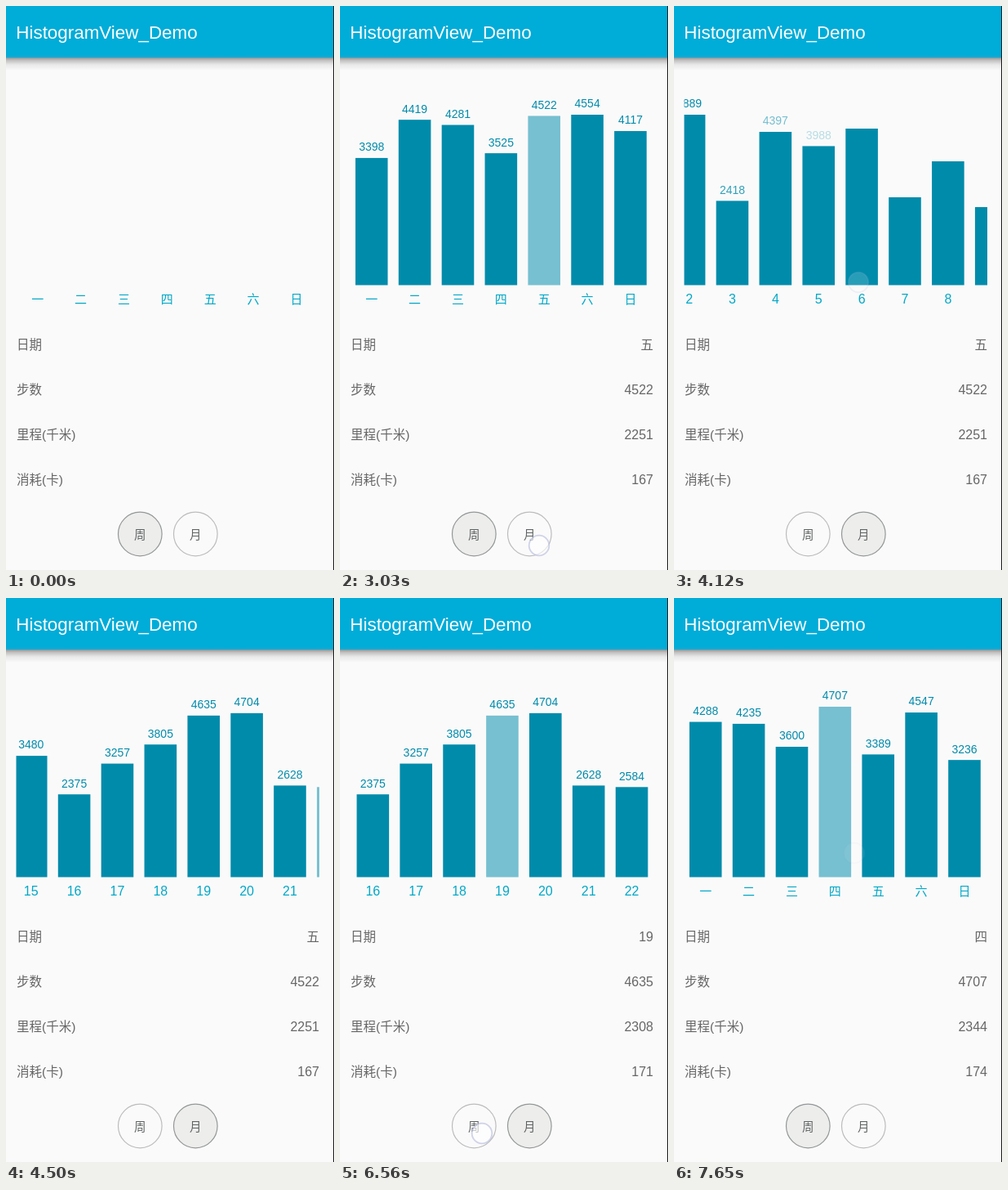
An HTML page with a canvas for the animation above (7.72 s loop, 402x690 px).

```html
<!DOCTYPE html>
<html lang="zh">
<head>
<meta charset="utf-8">
<title>HistogramView_Demo</title>
<style>
html, body { margin: 0; width: 100%; height: 100%; overflow: hidden; background: #fafafa; }
canvas { display: block; width: 402px; height: 690px; }
</style>
</head>
<body>
<canvas id="stage"></canvas>
<script>
const W = 402, H = 690, LOOP = 7720;
const BASE = 341.5, FULL = 208.5, LEFT = 18.9, PITCH = 52.88, BAR = 39.6;
const CLIP_L = 12.5, CLIP_R = 384;
const STAGGER = 68, FADE = 250, GROW = 620;
const MAX_SHIFT = 791.6;
const FONT = '"Liberation Sans", "Noto Sans CJK SC", "Noto Sans CJK", sans-serif';

const DAYS = [...'一二三四五六日'];
const WEEK_A = { labels: DAYS, values: [3398, 4419, 4281, 3525, 4522, 4554, 4117] };
const WEEK_B = { labels: DAYS, values: [4288, 4235, 3600, 4707, 3389, 4547, 3236] };
const MONTH = {
  values: [3120, 4889, 2418, 4397, 3988, 4490, 2520, 3552, 2239, 4105, 2870,
    3660, 4280, 2950, 3480, 2375, 3257, 3805, 4635, 4704, 2628, 2584]
};
MONTH.labels = MONTH.values.map((_, i) => String(i + 1));

// Each phase: when a chart is loaded, and which bar is selected from when
const PHASES = [
  { start: 85, data: WEEK_A, tab: 0, picks: [[0, 6], [1535, 5], [1980, 4]] },
  { start: 3080, data: MONTH, tab: 1, picks: [[0, 21], [5770, 19], [6140, 18]] },
  { start: 6600, data: WEEK_B, tab: 0, picks: [[0, 6], [7460, 3]] }
];
const SCROLL = { start: 3850, release: 4120, stop: 4570, drag: 70.6, settle: 4530 };

// [down, up, gone, x, y, travel]
const TOUCHES = [
  [1420, 1530, 1620, 298, 310, 0],
  [1860, 1990, 2100, 250, 310, 0],
  [3030, 3130, 3240, 244, 660, 0],
  [3810, 4050, 4145, 297, 338, -71],
  [5650, 5770, 5880, 252, 305, 0],
  [6020, 6140, 6250, 201, 305, 0],
  [6560, 6670, 6780, 174, 655, 0],
  [7340, 7500, 7670, 221, 312, 0]
];

const canvas = document.getElementById('stage');
const ctx = canvas.getContext('2d');
const dpr = window.devicePixelRatio || 1;
canvas.width = W * dpr;
canvas.height = H * dpr;

const clamp = v => Math.max(0, Math.min(1, v));
const ramp = (t, a, b) => clamp((t - a) / (b - a));
const easeInOut = u => 0.5 - Math.cos(u * Math.PI) / 2;

function text(str, x, y, size, color, align = 'left', weight = 400) {
  ctx.font = `${weight} ${size}px ${FONT}`;
  ctx.fillStyle = color;
  ctx.textAlign = align;
  ctx.fillText(str, x, y);
}

function circle(x, y, r, fill, stroke, width = 1) {
  ctx.beginPath();
  ctx.arc(x, y, r, 0, Math.PI * 2);
  if (fill) {
    ctx.fillStyle = fill;
    ctx.fill();
  }
  ctx.strokeStyle = stroke;
  ctx.lineWidth = width;
  ctx.stroke();
}

function scrollAt(t) {
  if (t < SCROLL.release) {
    return SCROLL.drag * ramp(t, SCROLL.start, SCROLL.release) ** 1.5;
  }
  const u = ramp(t, SCROLL.release, SCROLL.stop);
  return SCROLL.drag + (MAX_SHIFT - SCROLL.drag) * (1 - (1 - u) ** 1.5);
}

function pickAt(phase, t) {
  return phase.picks.filter(([from]) => t >= from).pop()[1];
}

function drawHeader() {
  const shade = ctx.createLinearGradient(0, 63, 0, 79);
  shade.addColorStop(0, 'rgba(0,0,0,.42)');
  shade.addColorStop(0.2, 'rgba(0,0,0,.24)');
  shade.addColorStop(0.55, 'rgba(0,0,0,.07)');
  shade.addColorStop(1, 'rgba(0,0,0,0)');
  ctx.fillStyle = shade;
  ctx.fillRect(0, 63, W, 16);
  ctx.fillStyle = '#00acd8';
  ctx.fillRect(0, 0, W, 63);
  text('HistogramView_Demo', 12.3, 40, 22.4, '#fff');
}

function drawChart(phase, t) {
  const { labels, values } = phase.data;
  const isMonth = phase.data === MONTH;
  const shift = isMonth ? scrollAt(t) : 0;
  const peak = Math.max(...values);
  const grow = easeInOut(ramp(t, phase.start, phase.start + GROW));
  const selected = pickAt(phase, t);
  const first = Math.max(0, Math.ceil((shift - LEFT - BAR + CLIP_L) / PITCH));

  let fadeStart = phase.start;
  if (isMonth && t >= SCROLL.start) {
    fadeStart = t < SCROLL.settle ? SCROLL.start : SCROLL.settle;
  }

  ctx.save();
  ctx.beginPath();
  ctx.rect(CLIP_L, 80, CLIP_R - CLIP_L, 300);
  ctx.clip();
  values.forEach((value, i) => {
    const x = LEFT + i * PITCH - shift;
    if (x > CLIP_R || x + BAR < CLIP_L) return;
    const mid = x + BAR / 2;
    text(labels[i], mid, 364, isMonth ? 16 : 15, '#00a8c8', 'center', isMonth ? 400 : 500);
    if (t < phase.start) return;
    const height = FULL * value / peak * grow;
    ctx.fillStyle = i === selected ? '#76c0d1' : '#008bab';
    ctx.fillRect(x, BASE - height, BAR, height);
    ctx.globalAlpha = clamp((t - fadeStart - (i - first) * STAGGER) / FADE);
    text(value, mid, BASE - height - 8.6, 14, '#008bab', 'center');
    ctx.globalAlpha = 1;
  });
  ctx.restore();
}

// The details follow the selected bar once it has come into view
function detailsAt(t) {
  const month = PHASES[1];
  const seen = PHASES.filter(p => t >= (p === month ? SCROLL.settle : p.start)).pop();
  if (!seen) return ['', '', '', ''];
  const i = pickAt(seen, t);
  const steps = seen.data.values[i];
  return [seen.data.labels[i], steps, Math.floor(steps * 0.498), Math.floor(steps * 0.037)];
}

function drawDetails(t) {
  const details = detailsAt(t);
  ['日期', '步数', '里程(千米)', '消耗(卡)'].forEach((name, i) => {
    const y = 420 + i * 55;
    text(name, 13, y, 15.5, '#666');
    text(details[i], 384, y, /\d/.test(details[i]) ? 16 : 15.5, '#666', 'right');
  });
}

function drawTabs(active) {
  ['周', '月'].forEach((name, i) => {
    const x = 164.3 + i * 68;
    const on = i === active;
    circle(x, 646, 26.8, on ? '#ededec' : null, on ? '#939797' : '#bcbcbc', 1.2);
    text(name, x, 651.5, 14.5, '#606464', 'center');
  });
}

function drawTouches(t) {
  for (const [down, up, gone, x, y, travel] of TOUCHES) {
    if (t < down || t >= gone) continue;
    ctx.globalAlpha = 1 - ramp(t, up, gone);
    circle(x + travel * ramp(t, down, up) ** 1.5, y, 12.3,
      'rgba(255,255,255,.62)', 'rgba(178,184,218,.6)', 1.8);
    ctx.globalAlpha = 1;
  }
}

function draw(t) {
  ctx.setTransform(dpr, 0, 0, dpr, 0, 0);
  ctx.fillStyle = '#fafafa';
  ctx.fillRect(0, 0, W, H);
  const phase = PHASES.filter(p => t >= p.start).pop() || PHASES[0];
  drawHeader();
  drawChart(phase, t);
  drawDetails(t);
  drawTabs(phase.tab);
  drawTouches(t);
  ctx.fillStyle = '#1c1c1c';
  ctx.fillRect(401, 0, 1, H);
}

const begin = performance.now();
function tick() {
  draw((performance.now() - begin) % LOOP);
  requestAnimationFrame(tick);
}
tick();
</script>
</body>
</html>
```
